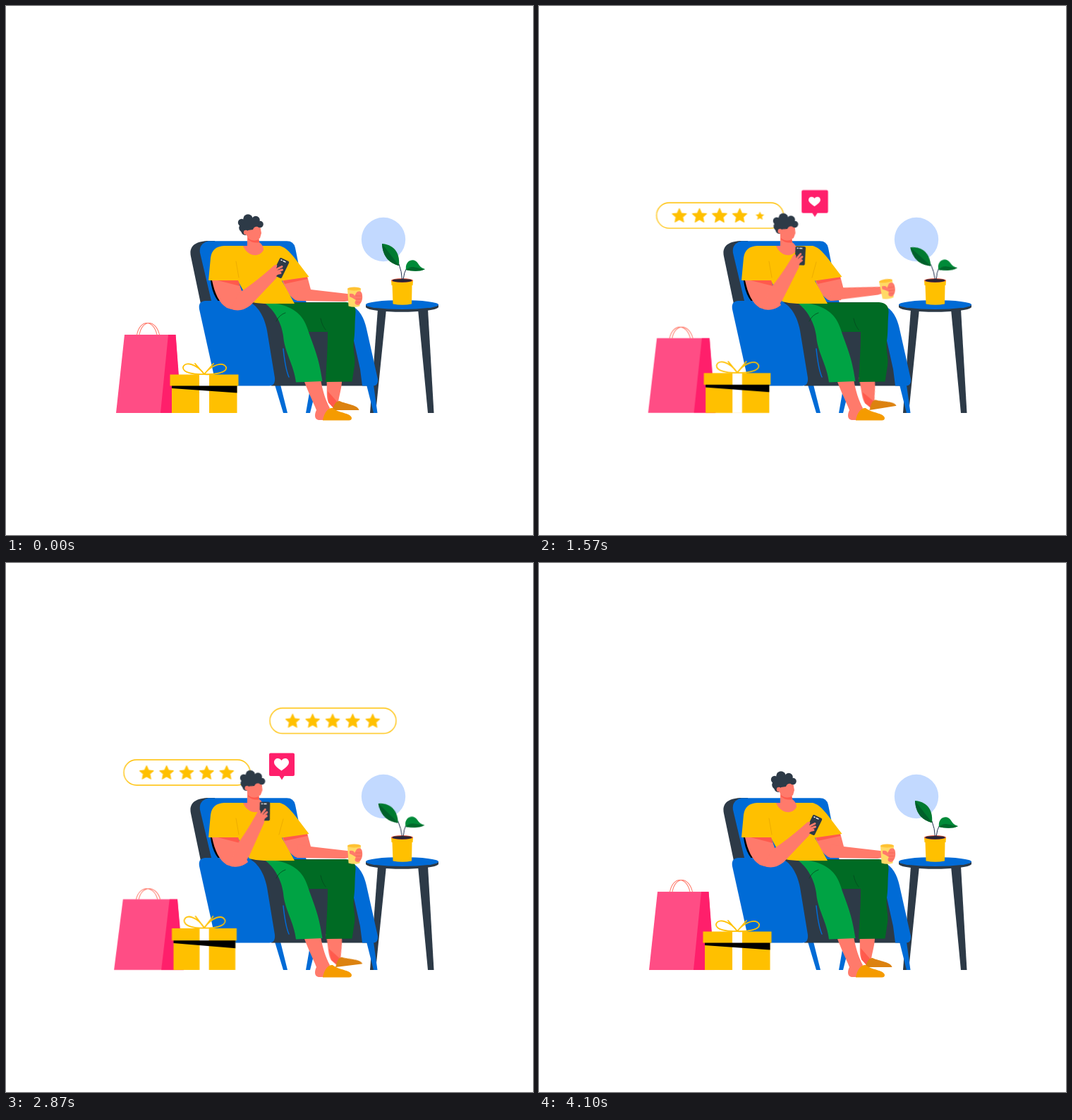
Animation of 747x750 px, one loop 4.13 s. Source, as an HTML page:

```html
<!DOCTYPE html>
<html lang="en">
<head>
<meta charset="utf-8">
<title>Armchair shopping</title>
<style>
  html, body { margin: 0; width: 100%; height: 100%; overflow: hidden; background: #fff; }
  svg { display: block; width: 747px; height: 750px; }
  .yellow { fill: #ffc000; }
  .skin { fill: #ff7a6b; }
  .shade { fill: #ff5a4d; }
  .dark { fill: #2d3a47; }
  .blue { fill: #006bd6; }
  .line { fill: none; stroke-linecap: round; stroke-linejoin: round; }

  .move { animation: 4130ms cubic-bezier(.37, 0, .63, 1) infinite both; }
  .bag { animation-name: bag; transform-origin: 201px 577px; }
  .gift { animation-name: gift; transform-origin: 281px 577px; }
  .stem { --turn: -5deg; animation-name: sway; transform-origin: 561px 388px; }
  .leaf { --turn: -7deg; animation-name: sway; transform-origin: 557px 368px; }
  .sprig { --turn: -4deg; animation-name: sway; transform-origin: 563px 387px; }
  .shin { --turn: -10.5deg; animation-name: sway; transform-origin: 465px 532px; }
  .head { animation-name: nod; transform-origin: 352px 334px; }
  .phone-arm { animation-name: lift; transform-origin: 322px 427px; }
  .phone { animation-name: wrist; transform-origin: 386px 374px; }
  .cup-arm { animation-name: sip; transform-origin: 412px 410px; }
  .bubble { animation-name: bubble; transform-origin: 391px 307px; }
  .heart { animation-name: heart; transform-origin: 390.5px 286px; }
  .vanish { animation-name: vanish; }
  .pop { animation-name: pop; animation-timing-function: ease-out; }
  .star { animation-name: star; animation-timing-function: ease-out; }

  @keyframes bag {
    0%, 50%, 100% { transform: none; }
    24.2%, 72.6% { transform: scale(1.067, .9); }
  }
  @keyframes gift {
    0%, 50%, 100% { transform: none; }
    24.2%, 72.6% { transform: scale(.945, 1.09); }
  }
  @keyframes sway {
    0%, 100% { transform: none; }
    50% { transform: rotate(var(--turn)); }
  }
  @keyframes nod {
    0%, 4.8%, 80%, 100% { transform: none; }
    17%, 70% { transform: translate(.5px, -.8px) rotate(5deg); }
  }
  @keyframes lift {
    0%, 12.1% { transform: none; }
    31.5% { transform: rotate(-17deg); }
    51.6% { transform: rotate(-16.3deg); }
    68%, 72.6% { transform: rotate(-19.4deg); }
    94.4%, 100% { transform: none; }
  }
  @keyframes wrist {
    0%, 12.1% { transform: none; }
    31.5%, 72.6% { transform: rotate(-6deg); }
    80% { transform: rotate(-9deg); }
    94.4%, 100% { transform: none; }
  }
  @keyframes sip {
    0%, 25.9%, 50.6%, 100% { transform: none; }
    38% { transform: rotate(-8deg); }
  }
  @keyframes bubble {
    0%, 30% { transform: scale(0); }
    38% { transform: translateY(-8.5px) scale(1.04, 1); }
    45%, 76.8% { transform: none; }
    80.4%, 100% { transform: scale(0); }
  }
  @keyframes heart {
    0%, 33.5% { transform: scale(0); }
    38% { transform: scale(.77); }
    45%, 100% { transform: none; }
  }
  @keyframes vanish {
    0%, 76.8% { transform: none; }
    80.4%, 100% { transform: scale(0); }
  }
  /* each pop starts after its own delay and clears once .vanish has hidden it */
  @keyframes pop {
    0% { transform: scale(0); opacity: 0; animation-timing-function: linear; }
    1.8% { opacity: 0; }
    4.6% { transform: scale(1); opacity: 1; }
    9% { transform: scale(1.03); }
    19%, 57.9% { transform: none; }
    58%, 100% { transform: scale(0); }
  }
  @keyframes star {
    0% { transform: scale(0); }
    6.5% { transform: scale(1.06); }
    13%, 57.9% { transform: none; }
    58%, 100% { transform: scale(0); }
  }
</style>
</head>
<body>
<svg viewBox="0 0 747 750">
  <circle cx="535" cy="331" r="31.2" fill="#c2d9ff"/>

  <!-- table -->
  <g class="dark">
    <path d="M527 430H539L524 577H516Z"/>
    <path d="M584 430H598L606.500 577H598Z"/>
    <path d="M510 423V427C514 436 608 436 613 427V423Z"/>
  </g>
  <ellipse class="blue" cx="561.5" cy="423.500" rx="51.500" ry="6.500"/>

  <!-- plant -->
  <path class="yellow" d="M546 389H577L576.500 396H575.500L575 422.500Q562 425 548.500 422.500L547.500 396H546.500Z"/>
  <ellipse cx="561.500" cy="389" rx="15.500" ry="3" fill="#e8604a"/>
  <ellipse cx="561.500" cy="389.300" rx="14" ry="2.400" fill="#2b2433"/>
  <g class="move stem">
    <path class="line" d="M561.500 388Q561 376 557 366" stroke="#1c2b4a"/>
    <g class="move leaf">
      <path fill="#007a30" d="M533 337C547 338 559 347 557 368C545 365 534 357 533 337Z"/>
      <path fill="#00602a" d="M533 337L557 368C545 365 534 357 533 337Z"/>
    </g>
  </g>
  <g class="move sprig">
    <path class="line" d="M563 388Q564 378 568 371" stroke="#1c2b4a"/>
    <path fill="#008a38" d="M567 374C565 360 579 356 584 365C587 370 590 372 594 373C587 377 574 376 567 374Z"/>
    <path fill="#00682a" d="M567 374C575 366 581 372 594 373C587 377 574 376 567 374Z"/>
  </g>

  <g id="ratings"></g>

  <g class="move bubble">
    <path fill="#ff1f6b" d="M375 269.500H407Q409 269.500 409 271.500V300Q409 302 407 302H394.500L391 307.500L387.500 302H375Q373 302 373 300V271.500Q373 269.500 375 269.500Z"/>
    <path class="move heart" fill="#fff" d="M390.500 294.500C384 290 380 286.500 380 282.500C380 276.500 387.500 275 390.500 280C393.500 275 401 276.500 401 282.500C401 286.500 397 290 390.500 294.500Z"/>
  </g>

  <!-- chair -->
  <path class="blue" d="M381 537H389L399 577H393ZM432 537H441L431 577H425ZM511 537H521L526.500 577H521Z"/>
  <path class="dark" d="M288 333C268 333 259 341 262 355L276 422H320L296 333Z"/>
  <path class="blue" d="M287 333.300H398Q408 333.300 410 343L426 422H292L275 350Q273 337 287 333.300Z"/>
  <path d="M290 389C292 408 300 422 314 430L320 425L302 389Z"/>
  <path class="dark" d="M335 420H480L512 538.500H376Z"/>
  <path class="blue" d="M282 418H342C357 424 366 440 370 460L381 527Q382 538.500 373 538.500H298L274 430Q272 419 282 418Z"/>
  <path class="blue" d="M492 426C505 434 509 448 512 462L527 529Q528 538.500 520 538.500H505L502 515L492 470Z"/>
  <path class="line" d="M393 486Q396 515 401 526" stroke="#006bd6" stroke-width="1.500"/>

  <!-- legs -->
  <g class="move shin">
    <path class="skin" d="M454 525H476C477 540 472 552 471 562L465 571L457 562C453 553 456 542 454 525Z"/>
    <path class="shade" d="M456 546L471 563L465 571L457 562Z"/>
    <path fill="#dc8210" d="M462 573C465 566 467 560 473 560C483 565 498 565 500.500 573Z"/>
  </g>
  <path fill="#006b24" d="M370 421L482 420Q496 421 495.500 434C494 452 495 463 493 475C491 488 496 498 494 510L490.500 532.500L453 533C454 510 456 490 456 462H427Z"/>
  <path class="skin" d="M422 530H446C449 546 453 559 459 570L450 587H443C437 586 437 579 440 573C435 560 428 547 422 530Z"/>
  <path fill="#f59b00" d="M449 587.500C451 576 457 569 463 570C471 577 489 577 490 584Q490 587.500 486 587.500Z"/>
  <path fill="#00a344" d="M366 421C390 420 412 429 421 444C427 454 428 460 431 468C439 490 444 502 448.500 532L411 533.500C408 508 395 492 393 468C391 450 380 430 366 421Z"/>
  <path class="line" d="M446 443Q448 453 453 459M383 447Q387 438 396 435" stroke="#064a20" stroke-width=".8"/>

  <!-- arm with cup -->
  <path class="skin" d="M391 387L427 383L432 402L428 417L413 418C402 414 396 402 391 387Z"/>
  <g class="move cup-arm">
    <path class="skin" d="M414 399L432 402L488 408.500L492 417L480 419L413 418Z"/>
    <path fill="#ffd966" d="M484 401H503L501.500 425.500Q494 428 485.500 425.500Z"/>
    <ellipse cx="493.500" cy="401" rx="9.500" ry="2.600" fill="#ffc233"/>
    <path class="skin" d="M487 408Q493 407 494 411L497 406C501 403 505 405 505 410C506 417 503 423 499 424C495 424 493 421 496 417Q492 414 487 412Z"/>
    <path class="line" d="M496 411H503M496 415.500H503M497 420H502" stroke="#f0604f" stroke-width=".7"/>
  </g>

  <!-- body -->
  <path class="shade" d="M391 385L427 383V387L395 394Z"/>
  <path class="yellow" d="M309 340H388C400 343 409 357 429.500 384L391 389.500L409 422H366Q355 422 345 419L329 390L287 389L290 357Q292 341 309 340Z"/>
  <path class="line" d="M326 362L330 385M393 363L387 385" stroke="#e6a400" stroke-width=".7"/>
  <path class="skin" d="M342 322H358L359 335Q365 339 365 346C359 357 343 356 336 340H342Z"/>
  <path class="shade" d="M343 329Q350 335 358 331L359 335Q350 337 343 331Z"/>

  <g class="move head">
    <path class="skin" d="M339 314L354 307L360 311L362 322L360 329Q354 334 347 331Q341 328 339 320Z"/>
    <g class="dark">
      <circle cx="334" cy="307" r="5.200"/>
      <circle cx="343" cy="302" r="6.800"/>
      <circle cx="354" cy="303.500" r="5.800"/>
      <circle cx="360" cy="309.500" r="4.800"/>
      <circle cx="336.500" cy="314.500" r="6.300"/>
      <path d="M333 303H358L357 313Q352 312 350 317L343 318L340 325Q333 325 332 315Z"/>
    </g>
    <circle class="skin" cx="340" cy="321" r="3.200"/>
  </g>

  <!-- arm with phone -->
  <path class="skin" d="M292 389H329L334 404L343 424Q330 435 313 428C302 421 296 408 292 389Z"/>
  <path class="shade" d="M300 389H329L331.500 397Z"/>
  <g class="move phone-arm">
    <path class="skin" d="M330 407Q354 391 373 374L381 367L388 375L383 386L347 424Q332 436 318 429Z"/>
    <g class="move phone">
      <g transform="translate(389.500 371.500) rotate(26)">
        <rect class="dark" x="-7.300" y="-13.300" width="14.600" height="26.600" rx="2"/>
        <path class="line" d="M-4.500 -10.500H-3.500M-1 -10.500H2" stroke="#fff" stroke-width="1.500"/>
      </g>
      <path class="skin" d="M374 374L382 367Q386 366 383 372L388 378L380 386Z"/>
      <path class="line" d="M382 374L391 369.500M383 377L391.500 374M382 380L389 378.500" stroke="#ff7a6b" stroke-width="3"/>
    </g>
  </g>

  <!-- shopping -->
  <g class="move bag">
    <path fill="#ff4d85" d="M168 466H240.500L248 577H156Z"/>
    <path fill="#ff1f6b" d="M230 466H240.500L249 577H219Z"/>
    <path class="line" d="M185.500 466C190 444 209 444 214 466M189 466C193 444 212 444 217.500 466" stroke="#ff7a6b"/>
  </g>
  <g class="move gift">
    <path class="yellow" d="M235 538H327.500V577H235ZM232.500 522.500H329.500V538.500H232.500Z"/>
    <path fill="#fff" d="M274 522.500H288V577H274Z"/>
    <path d="M235 538.500H327.500V548.500L235 542Z"/>
    <path class="line" d="M281 522C271 508 254 503 251 512C250 520 268 523 281 522C292 508 308 504 312 512C314 520 294 523 281 522M281 522L268 507M281 522L294 507" stroke="#ffc000" stroke-width="1.800"/>
  </g>
</svg>
<script>
  const starPath = "M" + Array.from({ length: 10 }, (_, i) => {
    const r = i % 2 ? 5 : 10.5, a = i * Math.PI / 5 - Math.PI / 2;
    return `${(r * Math.cos(a)).toFixed(2)} ${(r * Math.sin(a)).toFixed(2)}`;
  }).join("L") + "Z";

  const star = (i, start) => `<g transform="translate(${(i - 2) * 28.4 - .5} 0.8)">
    <path class="move star yellow" d="${starPath}" stroke="#ffc000" stroke-linejoin="round"
      style="animation-delay:${start + 40 + i * 125}ms"/></g>`;

  const rating = (x, y, start) => `<g transform="translate(${x} ${y})"><g class="move vanish">
    <g class="move pop" style="animation-delay:${start}ms">
      <rect x="-89.5" y="-18" width="179" height="36" rx="18" fill="#fff" stroke="#ffc000" stroke-width="1.3"/>
      ${[0, 1, 2, 3, 4].map(i => star(i, start)).join("")}
    </g></g></g>`;

  document.getElementById("ratings").innerHTML = rating(256.5, 297, 935) + rating(463.5, 223.7, 1500);
</script>
</body>
</html>
```
